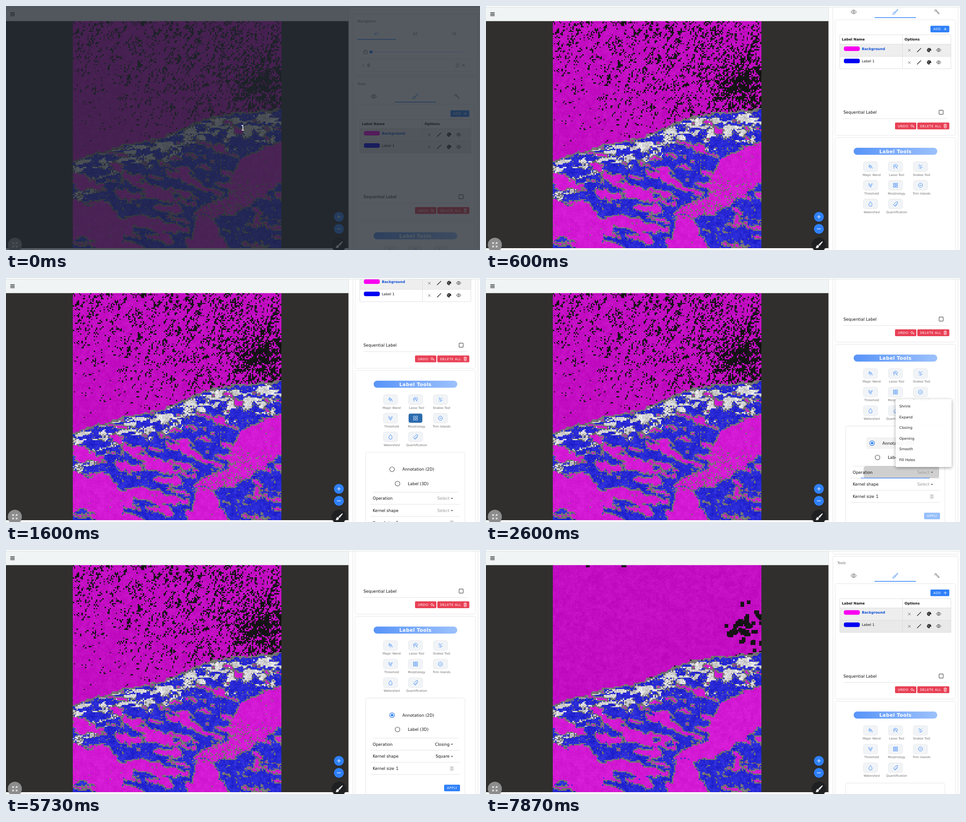
Write an HTML page with a canvas that moves like this. It is 1043x537 px and loops after 8 s.

```html
<!DOCTYPE html>
<html lang="en">
<head>
<meta charset="utf-8">
<title>Label tools</title>
<style>
html, body { margin: 0; width: 100%; height: 100%; overflow: hidden; }
body { position: relative; background: #302f2e; }
canvas { position: absolute; left: 147px; top: 33px; width: 459px; height: 505px; image-rendering: pixelated; }
svg { position: absolute; left: 0; top: 0; font-family: "DejaVu Sans", Verdana, sans-serif; }
.card { fill: #fff; filter: drop-shadow(0 .8px .9px rgba(0,0,0,.22)); }
.tool { fill: #f1f4f7; filter: drop-shadow(0 .8px .9px rgba(0,0,0,.22)); }
.round { filter: drop-shadow(0 1px 1.5px rgba(0,0,0,.3)); }
</style>
</head>
<body>
<canvas id="before" width="170" height="187"></canvas>
<canvas id="after" width="170" height="187"></canvas>
<svg id="ui" width="1043" height="537" viewBox="0 0 1043 537"></svg>
<script>
const W = 170, H = 187, CELL = 2.7;
const BLUE = '#2f80f8', RED = '#e84055';
const $ = id => document.getElementById(id);
const clamp = (v, a, b) => Math.min(b, Math.max(a, v));

// Piecewise linear value through [position, value] stops
function ramp(p, stops) {
  if (p <= stops[0][0]) return stops[0][1];
  for (let i = 1; i < stops.length; i++) {
    const [a, u] = stops[i - 1], [b, v] = stops[i];
    if (p <= b) return u + (v - u) * (p - a) / (b - a);
  }
  return stops[stops.length - 1][1];
}

/* ---------- segmented slice ---------- */
function hash(x, y, s) {
  let h = Math.imul(x, 374761393) ^ Math.imul(y, 668265263) ^ Math.imul(s, 974634777);
  h = Math.imul(h ^ h >>> 13, 1274126177);
  h = Math.imul(h ^ h >>> 15, 2246822519);
  return ((h ^ h >>> 16) >>> 0) / 4294967296;
}
function noise(x, y, s) {
  const i = Math.floor(x), j = Math.floor(y);
  const f = x - i, g = y - j;
  const u = f * f * (3 - 2 * f), v = g * g * (3 - 2 * g);
  const top = hash(i, j, s) * (1 - u) + hash(i + 1, j, s) * u;
  const low = hash(i, j + 1, s) * (1 - u) + hash(i + 1, j + 1, s) * u;
  return top * (1 - v) + low * v;
}
// Noise stretched along a direction
function streak(x, y, angle, len, wid, s) {
  const c = Math.cos(angle), n = Math.sin(angle);
  return noise((x * c + y * n) / len, (y * c - x * n) / wid, s);
}

const RIDGE = [[0, 309], [60, 290], [110, 275], [170, 263], [213, 252], [250, 235], [290, 217], [353, 204], [459, 195]];
const DEPTH = [[0, 90], [110, 160], [300, 240], [459, 270]];
const BAND = [[0, 56], [100, 52], [200, 44], [459, 42]];
const PINK_AREA = new Path2D(
  'M470 263L413 285L378 298L362 318L352 340L348 357L355 368L335 392L285 405L270 425L300 432L360 418L413 388L443 365L470 340Z' +
  'M-9 385L30 405L85 408L100 430L110 465L116 510L55 510L48 482L20 472L-9 486Z' +
  'M256 510L270 450L275 425L298 425L312 447L345 510Z');
const BLUE_AREA = new Path2D(
  'M470 340L443 368L413 393L360 418L306 432L318 455L345 510L470 510ZM-9 486L20 472L48 482L55 510L-9 510Z');
const VOID = 0, PINK = 1, BLU = 2, GREY = 3, WHITE = 4;
const probe = $('before').getContext('2d');

function sky(x, y, r) {
  const v = .55 * streak(x, y, -1.05, 9, 3.4, 3) + .45 * r;
  const cluster = Math.exp(-(((x - 426) / 72) ** 2) - ((y - 142) / 62) ** 2);
  const fade = clamp((y - 60) / 240, 0, 1) * clamp(1.25 - x / 420, .25, 1);
  return v > .685 - .065 * clamp((x - 80) / 250, 0, 1) + .2 * fade - .29 * cluster ? VOID : PINK;
}

function classify(i, j) {
  const x = (i + .5) * CELL, y = (j + .5) * CELL, r = hash(i, j, 1);
  const d = y - ramp(x, RIDGE) + (noise(x / 8, y / 8, 2) - .5) * 7;
  if (Math.abs(d) < 2.2) return GREY;
  if (d < 0) return sky(x, y, r);
  const wx = x + (noise(x / 9, y / 9, 4) - .5) * 9, wy = y + (noise(x / 9, y / 9, 5) - .5) * 9;
  const n = .82 * streak(wx, wy, .28, 30, 8.5, 6) + .18 * noise(x / 5, y / 5, 7);
  if (probe.isPointInPath(PINK_AREA, wx, wy)) {
    const speckled = x > 255 && y > 335 && y < 435;
    return r < (speckled ? .18 * clamp((y - 325) / 50, 0, 1) : .006) ? GREY : PINK;
  }
  if (probe.isPointInPath(BLUE_AREA, wx, wy)) return n > .76 ? PINK : n > .69 || r < .03 ? GREY : BLU;
  const q = clamp(d / ramp(x, DEPTH), 0, .9), limit = .82 - .28 * q;
  if (n > limit) return PINK;
  if (n > limit - .04) return GREY;
  const band = ramp(x, BAND);
  const w = .82 * streak(wx, wy, -.16, 17, 6, 8) + .18 * r;
  const cut = .52 + .3 * Math.max(0, (d - band * .65) / band) + (d < 6 ? .12 : 0);
  if (w > cut) return WHITE;
  return w > cut - .04 || r < .035 ? GREY : BLU;
}

const at = (map, i, j) => map[clamp(j, 0, H - 1) * W + clamp(i, 0, W - 1)];
const each = fn => { for (let j = 0; j < H; j++) for (let i = 0; i < W; i++) fn(i, j, j * W + i); };
function around(map, i, j, test) {
  for (let b = -1; b <= 1; b++) for (let a = -1; a <= 1; a++) if (test(at(map, i + a, j + b))) return true;
  return false;
}
function mapOf(fn) {
  const out = new Uint8Array(W * H);
  each((i, j, p) => { out[p] = fn(i, j, p); });
  return out;
}
const raw = mapOf(classify);
// Unlabelled rim where the other classes meet pink
const labels = mapOf((i, j, p) =>
  (raw[p] === BLU || raw[p] === WHITE) && hash(i, j, 9) < .8 && around(raw, i, j, v => v === PINK) ? GREY : raw[p]);
// Morphological closing of the pink label
const grown = mapOf((i, j) => around(labels, i, j, v => v === PINK) ? 1 : 0);
const closed = mapOf((i, j) => around(grown, i, j, v => !v) ? 0 : 1);
const result = mapOf((i, j, p) => closed[p] && (labels[p] === VOID || labels[p] === GREY) ? PINK : labels[p]);

function paint(id, map) {
  const ctx = $(id).getContext('2d'), img = ctx.createImageData(W, H);
  each((i, j, p) => {
    const s = hash(i, j, 11) - .5 + noise(i / 3, j / 3, 12) - .5;
    const ground = j * CELL > ramp(i * CELL, RIDGE);
    const [r, g, b, amp] = [
      [20, 20, 20, 8],
      ground ? [211, 25, 211, 10] : [194, 13, 194, 10],
      [40, 40, 212, 18],
      [116, 116, 116, 20],
      [212, 212, 212, 40]][map[p]];
    img.data.set([r + s * amp, g + s * amp, b + s * amp, 255], p * 4);
  });
  ctx.putImageData(img, 0, 0);
}
paint('before', labels);
paint('after', result);

/* ---------- interface ---------- */
const rect = (x, y, w, h, fill, more = '') => `<rect x="${x}" y="${y}" width="${w}" height="${h}" fill="${fill}" ${more}/>`;
const card = (x, y, w, h, cls = 'card', more = '') => `<rect class="${cls}" x="${x}" y="${y}" width="${w}" height="${h}" rx="2" ${more}/>`;
const dot = (x, y, r, fill, more = '') => `<circle cx="${x}" cy="${y}" r="${r}" fill="${fill}" ${more}/>`;
const rule = (x1, x2, y, color = '#e2e2e2', w = 1, more = '') =>
  `<path d="M${x1} ${y}H${x2}" stroke="${color}" stroke-width="${w}" ${more}/>`;
const text = (x, y, s, size = 8.75, fill = '#111', more = '') =>
  `<text x="${x}" y="${y + size * .365}" font-size="${size}" fill="${fill}" ${more}>${s}</text>`;
const MID = 'text-anchor="middle"', END = 'text-anchor="end"', BOLD = 'font-weight="bold"', CAPS = 'letter-spacing=".5"';

const ICON = {
  eye: 'M-6 0Q0-8.5 6 0Q0 8.5-6 0ZM-2 0a2 2 0 1 0 4 0a2 2 0 1 0-4 0',
  brush: 'M5.5-6L6.3-5.2L.8 1.8L-1.2 0ZM-2 .8Q-4.5 .5-4.6 3Q-4.8 4.8-6 5.3Q-1.5 6.8-.2 2.6Z',
  wand: 'M-2.2-2.2L-.8-3.5L6 4L4.7 5.3ZM-3-6v2M-6-3h2M-5-5.4l1.2 1.2M-.5-5.5l-.8 1.2M-5.5-.3l1.3-.8',
  cross: 'M-3.5-3.5L3.5 3.5M3.5-3.5L-3.5 3.5',
  pen: 'M4.5-5L5.2-4.3L-4 4.8L-5.2 5.2L-4.8 4Z',
  plus: 'M-4 0H4M0-4V4',
  minus: 'M-4 0H4',
  undo: 'M-1-4L-4.5-.5L-1 3V1Q3 1 4.5 4Q4.5-1.5-1-2Z',
  bin: 'M-4-3H4M-3-3L-2.5 5H2.5L3-3M-1.5-3V-5H1.5V-3M-1-1V3M1-1V3',
  bucket: 'M-4.5-.5L-1-4L3.5 .5L0 4ZM-4-.5H3M4.5 2v2.5M-3.5-5.5L-1-3',
  lasso: 'M-5 0Q-5-5 0-5Q5-5 5-1Q4 2 1 1L0-2Q-4-2-4 1Q-2 3-4 5M1 1L5 5',
  snakes: 'M-5-3Q-3-6-1-3T3-3M-4 1Q-2-2 0 1T5 1M-2 5Q0 2 2 5M-5 4h1M4-5h1',
  curve: 'M-5-4L-3-4Q-1-4-1 2Q-1 5 0 5Q2 5 2-2Q2-4 5-4M-5-2Q-3 0-3 2M5-2L3 0',
  grid: 'M-5-5H-1V-1H-5ZM1-5H5V-1H1ZM-5 1H-1V5H-5ZM1 1H5V5H1Z',
  trim: 'M-5 0a5 5 0 1 0 10 0a5 5 0 1 0-10 0M-2.5 0H2.5',
  drop: 'M0-5.5Q4-1 4 2A4 4 0 0 1-4 2Q-4-1 0-5.5Z',
  tag: 'M-5 2L2-5H5V-2L-2 5ZM-2 5.5L0 5.5L5.5 0',
  expand: 'M-6-2V-6H-2M-6-6L-2-2M2-6H6V-2M6-6L2-2M-6 2V6H-2M-6 6L-2 2M6 2V6H2M6 6L2 2',
  updown: 'M-2-1.5L0-3.5L2-1.5M-2 1.5L0 3.5L2 1.5'
};
const icon = (name, x, y, color, scale = 1, fill = 'none', w = 1) =>
  `<path d="${ICON[name]}" transform="translate(${x} ${y}) scale(${scale})" fill="${fill}" stroke="${color}" stroke-width="${w}" stroke-linejoin="round"/>`;

function button(x, y, w, h, label, fill, iconName, id = '') {
  return rect(x, y, w, h, fill, `rx="2" ${id && `id="${id}"`}`) +
    text(x + 6.2, y + h / 2, label, 7, '#fff', CAPS) +
    (iconName ? icon(iconName, x + w - 9, y + h / 2, '#fff', .85) : '');
}

function navCard() {
  const tabs = ['XY', 'XZ', 'YZ'].map((s, i) => text(815 + i * 85.5, 61, s, 7.6, i ? '#666' : BLUE, MID)).join('');
  return card(764, 19, 274, 132) + text(773, 33, 'Navigation', 7.6, '#6b6b6b') + tabs +
    rule(773, 858, 73.5, BLUE, 1.3) +
    '<path d="M787 100h8v5h-8zM788 99l1-2h4l1 2" fill="none" stroke="#777"/>' +
    rule(801, 1007, 101, '#a5c8fb', 1.2) + dot(803, 101, 3.3, BLUE) +
    rule(773, 1027, 116.5) + text(784, 131, 'Z', 7.6, '#999') + text(795, 131, '0') +
    rect(989, 125, 9, 11, '#e6e6e6', 'rx="1"') + icon('updown', 993.5, 130.5, '#777', .8) +
    icon('cross', 1006.5, 130.5, '#444', .9) + rule(777, 1027, 144);
}

function labelRow(y, color, name, nameColor, more) {
  const palette = dot(975, y + 3, 4.6, '#111') + dot(973, y + 1.5, .9, '#fff') + dot(976, y + .8, .9, '#fff') +
    dot(973.5, y + 4.5, .9, '#fff') + dot(977.5, y + 5.5, 1.4, '#fff');
  return rect(787.5, y - 5, 35, 10, color, 'rx="4"') + text(827, y, name, 7.6, nameColor, more) +
    icon('cross', 931.5, y + 3.5, '#333', .75) + icon('pen', 953, y + 3, '#111', .85, '#111', .6) + palette +
    icon('eye', 996, y + 3, '#222', .85);
}

function labelCard() {
  return card(769, 217, 263, 253) + button(978, 229.5, 41.5, 14.5, 'ADD', BLUE, 'plus') +
    rect(778.5, 270, 244.5, 27, '#eee') + rect(778.5, 297, 244.5, 27, '#e9e9e9', 'id="row"') +
    '<path d="M778.5 249.5H1023V324H778.5ZM778.5 270H1023M778.5 297H1023M916.5 249.5V324" fill="none" stroke="#dedede"/>' +
    text(783, 259.5, 'Label Name', 7.6, '#111', BOLD) + text(921, 259.5, 'Options', 7.6, '#111', BOLD) +
    labelRow(280, '#f800f0', 'Background', '#0d4fd6', BOLD) + labelRow(307, '#0000f2', 'Label 1', '#111', '') +
    text(786.5, 420, 'Sequential Label') +
    rect(997, 415.3, 9, 9, '#fff', 'rx="1" stroke="#555" stroke-width="1.2"') + rule(786.5, 1015, 434) +
    button(900, 442.5, 47, 15, 'UNDO', RED, 'undo') + button(949, 442.5, 70.5, 15, 'DELETE ALL', RED, 'bin');
}

function toolsCard() {
  const tools = [['bucket', 'Magic Wand'], ['lasso', 'Lasso Tool'], ['snakes', 'Snakes Tool'], ['curve', 'Threshold'],
    ['grid', 'Morphology'], ['trim', 'Trim Islands'], ['drop', 'Watershed'], ['tag', 'Quantification']];
  const keys = tools.map(([name, label], i) => {
    const x = 846 + i % 3 * 55, y = 539.5 + Math.floor(i / 3) * 41;
    const live = name === 'grid' ? `<g id="hot">${rect(x - 15, y - 10, 30, 20, '#2a6aae', 'rx="4"')}${icon(name, x, y, '#cfe4ff', .9)}</g>` : '';
    return card(x - 15, y - 10, 30, 20, 'tool', 'style="rx:4px"') + icon(name, x, y, BLUE, .9) + live +
      text(x + 2.5, y + 18, label, 6.55, '#6c6c6c', MID);
  }).join('');
  return card(769, 476, 263, 700) + rect(809, 498, 184, 15.5, 'url(#pill)', 'rx="7.7"') +
    text(901, 506, 'Label Tools', 10.5, '#fff', `${MID} ${BOLD} ${CAPS}`) + keys;
}

function radio(x, y, label, id) {
  return dot(x, y, 5.2, '#fff', 'stroke="#555" stroke-width="1.1"') + text(x + 22.7, y, label) +
    (id ? `<g id="${id}">${dot(x, y, 5.2, '#fff', `stroke="${BLUE}" stroke-width="1.2"`)}${dot(x, y, 2.8, BLUE)}</g>` : '');
}
function selectRow(y, label, id) {
  return rect(831, y - 13.5, 166, 27, '#000', `rx="5" id="${id}Ripple"`) + text(807, y, label) +
    `<g id="${id}Value">${text(976, y, 'Select', 8.75, '#999', END)}</g><path d="M978.5 ${y - 1}h5.5l-2.75 2.8z" fill="#666"/>` +
    rule(802, 999, y + 13) + rule(802, 999, y + 12.8, BLUE, 1.3, `id="${id}Line"`);
}
function morphPanel() {
  return `<g id="morph">${card(792, 656, 217, 400)}${rect(837, 680, 118, 25.5, '#f3f3f3', 'id="hover"')}` +
    radio(849.5, 693, 'Annotation (2D)', 'picked') + radio(861.5, 724.5, 'Label (3D)') + rule(807, 995, 743.5) +
    selectRow(757, 'Operation', 'op') + selectRow(783.7, 'Kernel shape', 'shape') +
    text(807, 810.5, 'Kernel size') + text(858, 810.5, '1') +
    rect(976.5, 805, 9, 11, '#e6e6e6', 'rx="1"') + icon('updown', 981, 810.5, '#777', .8) + rule(802, 999, 823.5) +
    button(964, 846, 35, 14.5, 'APPLY', BLUE, '', 'apply') + rect(964, 846, 35, 14.5, '#fff', 'rx="2" id="applyRipple"') + '</g>';
}

function menu(id, bottom, items, hot) {
  const h = items.length * 26.2 + 9, top = bottom - h;
  const y = i => top + 17.6 + i * 26.2;
  return `<g id="${id}">${card(895, top, 137, h, 'card', 'style="filter:drop-shadow(0 2px 4px rgba(0,0,0,.4))"')}` +
    rect(895, y(hot) - 13, 137, 26.2, '#edf4fe', `id="${id}Hot"`) +
    rect(911, y(hot) - 13, 87, 26.2, '#000', `rx="6" id="${id}Press"`) +
    items.map((s, i) => text(904, y(i), s)).join('') + '</g>';
}

$('ui').innerHTML =
  `<defs><linearGradient id="pill"><stop stop-color="#5894f8"/><stop offset="1" stop-color="#9cc1fc"/></linearGradient>
  <clipPath id="view"><path d="M754 3H1043V537H754Z"/></clipPath></defs>` +
  rect(0, 0, 1043, 3, '#fff') + rect(0, 3, 754, 30.3, '#f1f4f4') + rect(0, 533, 754, 4, '#fff') +
  text(0, 539.5, 'slice 0 of 64', 6.5, '#333') +
  '<path d="M9.5 14.7H19M9.5 18H19M9.5 21.3H19" stroke="#111" stroke-width="1.3"/>' +
  dot(19.5, 525.5, 15.5, '#8c8c8c', 'class="round"') + icon('expand', 19.5, 525.5, '#fff', .85, 'none', 1.2) +
  dot(732.5, 464, 10.8, BLUE, 'class="round"') + icon('plus', 732.5, 464, '#fff', 1, 'none', 1.2) +
  dot(732.5, 490.5, 10.8, BLUE, 'class="round"') + icon('minus', 732.5, 490.5, '#fff', 1, 'none', 1.2) +
  dot(732.5, 525.5, 15.5, '#1e2022', 'class="round"') + icon('brush', 733, 525.5, '#fff', 1.25, '#fff', .4) +
  rect(754, 3, 289, 534, '#fefefe') + '<path d="M754 3V537" stroke="#e4e4e4"/>' +
  `<g clip-path="url(#view)"><g id="scroll">${navCard()}${card(764, 157, 274, 1100)}` +
  text(773, 171, 'Tools', 7.6, '#6b6b6b') + icon('eye', 809, 199, '#555') + icon('brush', 900.5, 199, BLUE, .95) +
  icon('wand', 992, 199, '#444', .9) + rule(855, 946, 211.5, BLUE, 1.3) +
  `${labelCard()}${toolsCard()}${morphPanel()}</g>` +
  menu('opMenu', 416, ['Shrink', 'Expand', 'Closing', 'Opening', 'Smooth', 'Fill Holes'], 2) +
  menu('shapeMenu', 442, ['Square', 'Disk', 'Diamond', 'Octagon', 'Star'], 0) + '</g>' +
  rule(0, 1043, 2.5, '#dcdfe0') +
  `<g id="count">${rect(0, 0, 1043, 537, '#20272f', 'opacity=".76"')}${text(521, 268.5, '1', 15, '#fff', MID)}</g>`;

/* ---------- timeline, in ticks of 1/15 s ---------- */
const TICK = 1000 / 15;
const fade = (id, v) => { $(id).style.opacity = v; };
const show = (id, on) => { $(id).style.display = on ? '' : 'none'; };
function setMenu(id, k, open, close, bottom) {
  const s = ramp(k, [[open, .78], [open + 2, .9], [open + 4, 1]]);
  show(id, k >= open && k < close + 2);
  show(id + 'Hot', k >= open + 5);
  fade(id, k < close ? ramp(k, [[open, .3], [open + 2, .94], [open + 4, 1]]) : ramp(k, [[close, .4], [close + 2, 0]]));
  $(id).setAttribute('transform', `translate(958 ${bottom}) scale(${s}) translate(-958 ${-bottom})`);
  fade(id + 'Press', k >= close ? .09 : 0);
}
function setSelect(id, k, open, blur, chosenAt, value) {
  fade(id + 'Ripple', k < open ? 0 : ramp(k, [[open, .1], [open + 2, .19], [open + 7, 0]]));
  const half = k < open || k >= blur ? 0 : ramp(k, [[open, 30], [open + 2, 76], [open + 4, 98.5]]);
  $(id + 'Line').setAttribute('d', $(id + 'Line').getAttribute('d').replace(/M\S+( \S+)H\S+/, `M${900.5 - half}$1H${900.5 + half}`));
  const label = $(id + 'Value').firstChild, done = k >= chosenAt;
  label.textContent = done ? value : 'Select';
  label.setAttribute('fill', done ? '#111' : '#999');
}

function render(k) {
  const y = ramp(k, [[6, 0], [7, 48], [8, 120], [9, 186], [10, 225.5], [22, 225.5], [24, 272], [27, 329.5],
    [109, 329.5], [110, 285], [111, 225], [112, 175], [113, 142.5]]);
  $('scroll').setAttribute('transform', `translate(0 ${-y})`);
  show('count', k < 1);
  show('row', k < 7 || k >= 118);
  show('morph', k >= 17);
  fade('hot', k < 17 ? 0 : ramp(k, [[17, .6], [18, 1], [31, 1], [34, 0]]));
  show('picked', k >= 34);
  show('hover', k >= 32 && k < 43);
  setSelect('op', k, 37, 71, 64, 'Closing');
  setSelect('shape', k, 71, 86, 84, 'Square');
  setMenu('opMenu', k, 37, 64, 416);
  setMenu('shapeMenu', k, 71, 84, 442);
  $('apply').setAttribute('fill', k >= 91 && k < 104 ? '#2668cf' : BLUE);
  fade('apply', ramp(k, [[83, .5], [86, 1]]));
  fade('applyRipple', k < 94 ? 0 : ramp(k, [[94, .15], [96, .3], [101, 0]]));
  show('after', k >= 97);
}

let last = -1;
function loop() {
  const k = Math.floor((performance.now() % 8000 + 5) / TICK) % 120;
  if (k !== last) render(last = k);
  requestAnimationFrame(loop);
}
loop();
</script>
</body>
</html>
```
